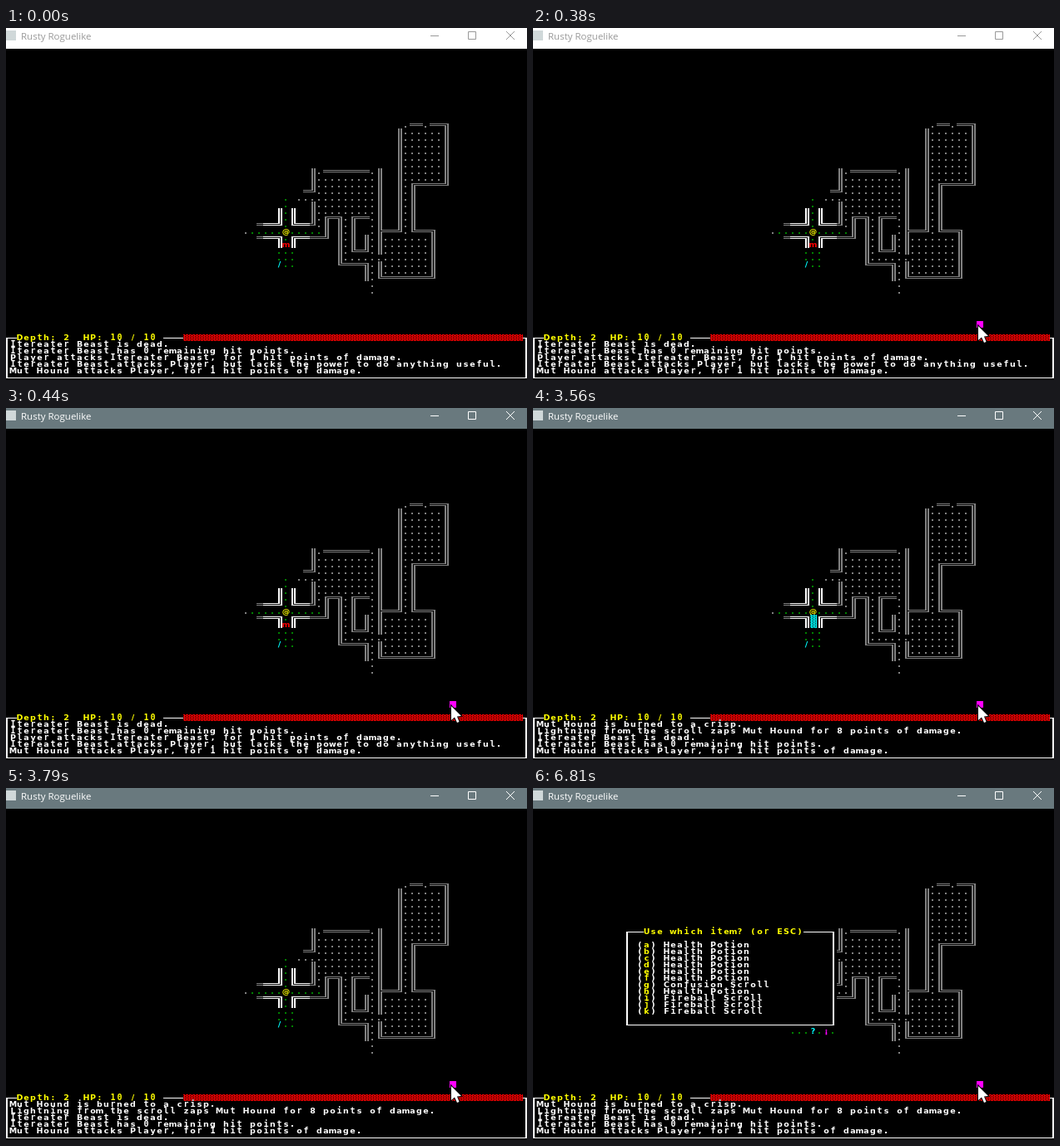
These frames come from a looping animation (626 px wide and 424 px high, 8000 ms). An HTML page with a canvas:

```html
<!DOCTYPE html>
<html>
<head>
<meta charset="utf-8">
<title>Roguelike</title>
<style>
html, body { margin: 0; width: 100%; height: 100%; overflow: hidden; background: #000; }
canvas { display: block; }
</style>
</head>
<body>
<canvas id="stage" width="626" height="424"></canvas>
<script>
const ctx = document.getElementById('stage').getContext('2d');
const LOOP = 8000, CELL = 8, TOP = 25, LEFT = -3;
const GRAY = '#808080', GREEN = '#008000', YELLOW = '#ff0', CYAN = '#0ff';
const RED = '#f00', MAGENTA = '#f0f', WHITE = '#fff', BLACK = '#000';

const LOG_BEFORE = [
  'Itereater Beast is dead.',
  'Itereater Beast has 0 remaining hit points.',
  'Player attacks Itereater Beast, for 1 hit points of damage.',
  'Itereater Beast attacks Player, but lacks the power to do anything useful.',
  'Mut Hound attacks Player, for 1 hit points of damage.'
];
const LOG_AFTER = [
  'Mut Hound is burned to a crisp.',
  'Lightning from the scroll zaps Mut Hound for 8 points of damage.',
  LOG_BEFORE[0], LOG_BEFORE[1], LOG_BEFORE[4]
];
const HEALTH = 'Health Potion', FIRE = 'Fireball Scroll';
const ITEMS = [...Array(6).fill(HEALTH), 'Confusion Scroll', HEALTH, FIRE, 'Zap Scroll', FIRE, FIRE];
const ITEMS_LEFT = ITEMS.filter(name => name !== 'Zap Scroll');

// The dungeon: dig rooms and corridors, then wall in everything around them
const floors = new Set(), walls = new Set();
const key = (x, y) => x + ',' + y;
const point = k => k.split(',').map(Number);

function eachCell(x1, y1, x2, y2, visit) {
  for (let y = y1; y <= y2; y++)
    for (let x = x1; x <= x2; x++) visit(x, y);
}
function open(x, y, w = 1, h = 1) {
  eachCell(x, y, x + w - 1, y + h - 1, (cx, cy) => floors.add(key(cx, cy)));
}
function dig(x, y, w, h) {
  open(x, y, w, h);
  eachCell(x - 1, y - 1, x + w, y + h, (cx, cy) => walls.add(key(cx, cy)));
}

dig(60, 12, 6, 8);    // upper room and its corridor
dig(60, 20, 1, 8);
dig(57, 28, 7, 6);    // lower room
dig(47, 19, 9, 6);    // middle room and the passages leaving it
dig(46, 22, 1, 1);
dig(47, 25, 1, 3);
dig(51, 25, 1, 7);
dig(51, 31, 6, 1);
dig(55, 25, 1, 9);
dig(39, 27, 8, 1);    // crossroads
dig(42, 25, 1, 4);
open(60, 11);         // ways out, known but not walled yet
open(63, 11);
open(47, 18);
open(55, 18);
open(44, 22, 2);
open(42, 22, 1, 8);
open(36, 27, 3);
open(55, 34, 1, 3);
const unexplored = ['59,11', '45,23', '54,26', '54,27'];
for (const k of [...floors, ...unexplored]) walls.delete(k);

const px = c => LEFT + c * CELL;
const py = r => TOP + r * CELL;

function rect(color, x, y, w, h) {
  ctx.fillStyle = color;
  ctx.fillRect(x, y, w, h);
}

// One character per terminal cell
function print(text, c, r, color) {
  ctx.fillStyle = color;
  ctx.textAlign = 'center';
  [...text].forEach((ch, i) => {
    if (ch === '.') return ctx.fillRect(px(c + i) + 2, py(r) + 5, 2, 2);
    ctx.font = /[fijlrtI01]/.test(ch)
      ? 'bold 10px "DejaVu Sans Mono", monospace'
      : 'bold 9.5px "DejaVu Sans", sans-serif';
    ctx.fillText(ch, px(c + i) + 3.5, py(r) + 7);
  });
}

// Cells filled at three quarters density
function shade(color, c, r, w, h) {
  rect(color, px(c), py(r), w * CELL, h * CELL);
  for (let y = 0; y < h * CELL; y++)
    for (let x = y % 2 ? 0 : 2; x < w * CELL; x += 4) rect(BLACK, px(c) + x, py(r) + y, 1, 1);
}

function box(c1, r1, c2, r2) {
  const x = px(c1) + 3, y = py(r1) + 4, right = px(c2) + 3, bottom = py(r2) + 4;
  rect(WHITE, x, y, right - x + 2, 1);
  rect(WHITE, x, bottom, right - x + 2, 1);
  rect(WHITE, x, y, 2, bottom - y);
  rect(WHITE, right, y, 2, bottom - y);
}

// Double-line wall piece shaped by its neighbours
function drawWall(x, y, color) {
  let up = walls.has(key(x, y - 1)), down = walls.has(key(x, y + 1));
  let left = walls.has(key(x - 1, y)), right = walls.has(key(x + 1, y));
  if (!left && !right) up = down = true;
  if (!up && !down) left = right = true;
  const X = px(x), Y = py(y);
  if (up) rect(color, X + 2, Y, 5, 5);
  if (down) rect(color, X + 2, Y + 2, 5, 6);
  if (left) rect(color, X, Y + 2, 7, 3);
  if (right) rect(color, X + 2, Y + 2, 6, 3);
  if (up) rect(BLACK, X + 4, Y, 1, 4);
  if (down) rect(BLACK, X + 4, Y + 3, 1, 5);
  if (left) rect(BLACK, X, Y + 3, 5, 1);
  if (right) rect(BLACK, X + 4, Y + 3, 4, 1);
}

function drawMap(moved, bolt, houndAlive) {
  const playerY = moved ? 28 : 27;
  for (const k of floors) {
    const [x, y] = point(k), dx = Math.abs(x - 42);
    const seen = (dx === 0 && playerY - y <= 5) || (y === 27 && dx <= (moved ? 1 : 5));
    print('.', x, y, seen ? GREEN : GRAY);
  }
  // The cavern to the south opens up as the player gets closer
  for (let y = 30; y <= (moved ? 33 : 32); y++) {
    const half = moved ? Math.round((y - 28) * 0.6) : 1;
    for (let x = 42 - half; x <= 42 + half; x++) print('.', x, y, GREEN);
  }
  for (const k of walls) {
    const [x, y] = point(k), dx = Math.abs(x - 42);
    const reach = !moved ? 3 : y === 26 ? 2 : 1;
    drawWall(x, y, dx <= reach && y >= playerY - 3 && y <= 29 ? WHITE : GRAY);
  }
  const entity = (glyph, x, y, color) => {
    rect(BLACK, px(x), py(y), CELL, CELL);
    print(glyph, x, y, color);
  };
  entity('/', 41, 32, CYAN);
  entity('@', 42, playerY, YELLOW);
  if (houndAlive) entity('m', 42, 29, RED);
  if (bolt) shade(CYAN, 42, 28, 1, 2);
  if (moved) {
    entity('i', 44, 31, RED);
    entity('?', 42, 33, CYAN);
    entity('¡', 44, 33, MAGENTA);
  }
}

function drawHud(log) {
  box(0, 43, 78, 49);
  rect(BLACK, px(2), py(43), 22 * CELL, CELL);
  print('Depth: 2  HP: 10 / 10', 2, 43, YELLOW);
  shade(RED, 27, 43, 51, 1);
  log.forEach((line, i) => print(line, 1, 44 + i, WHITE));
}

function drawMenu(items) {
  const top = 29 - items.length;
  rect(BLACK, px(14), py(top), 32 * CELL, (33 - top) * CELL);
  box(14, top, 45, 32);
  rect(BLACK, px(17), py(top), 24 * CELL, CELL);
  print('Use which item? (or ESC)', 17, top, YELLOW);
  items.forEach((name, i) => {
    const r = top + 2 + i;
    print('( )', 16, r, WHITE);
    print(String.fromCharCode(97 + i), 17, r, YELLOW);
    print(name, 20, r, WHITE);
  });
}

function drawTitleBar(active) {
  const ink = active ? WHITE : '#999';
  rect(active ? '#69797e' : WHITE, 0, 0, 626, TOP);
  rect('#d0d8d9', 0, 3, 12, 12);
  ctx.font = '11.5px "Open Sans", sans-serif';
  ctx.textAlign = 'left';
  ctx.fillStyle = ink;
  ctx.fillText('Rusty Roguelike', 18, 14);
  ctx.strokeStyle = ink;
  ctx.lineWidth = 1;
  ctx.beginPath();
  ctx.moveTo(510, 9.5); ctx.lineTo(520, 9.5);
  ctx.rect(555.5, 4.5, 9, 9);
  ctx.moveTo(601, 4); ctx.lineTo(611, 14);
  ctx.moveTo(611, 4); ctx.lineTo(601, 14);
  ctx.stroke();
}

// The pointer comes in from the bottom edge in three jumps
function mouseAt(t) {
  if (t < 210) return null;
  const left = Math.max(0, 2 - Math.floor((t - 210) / 85));
  return [535 + left * 11, 359 + left * 25];
}

function drawMouseCell([x, y]) {
  const c = Math.floor((x - LEFT) / CELL), r = Math.floor((y - TOP) / CELL);
  rect(MAGENTA, px(c), py(r), CELL, CELL);
}

function drawPointer([x, y]) {
  ctx.beginPath();
  for (const [dx, dy] of [[0, 0], [0, 17], [4, 13.5], [7, 20], [9.5, 19], [7, 12.5], [12, 12]])
    ctx.lineTo(x + dx, y + dy);
  ctx.closePath();
  ctx.strokeStyle = BLACK;
  ctx.lineWidth = 2;
  ctx.stroke();
  ctx.fillStyle = WHITE;
  ctx.fill();
}

function draw(t) {
  const zapped = t >= 3560, moved = t >= 5570, mouse = mouseAt(t);
  rect(BLACK, 0, 0, 626, 424);
  if (mouse) drawMouseCell(mouse);
  drawMap(moved, zapped && t < 3790, !zapped);
  drawHud(zapped ? LOG_AFTER : LOG_BEFORE);
  if (t >= 1390 && !zapped) drawMenu(ITEMS);
  if (t >= 6810) drawMenu(ITEMS_LEFT);
  drawTitleBar(t >= 440);
  if (mouse) drawPointer(mouse);
}

const start = performance.now();
function tick() {
  draw((performance.now() - start) % LOOP);
  requestAnimationFrame(tick);
}
tick();
</script>
</body>
</html>
```
